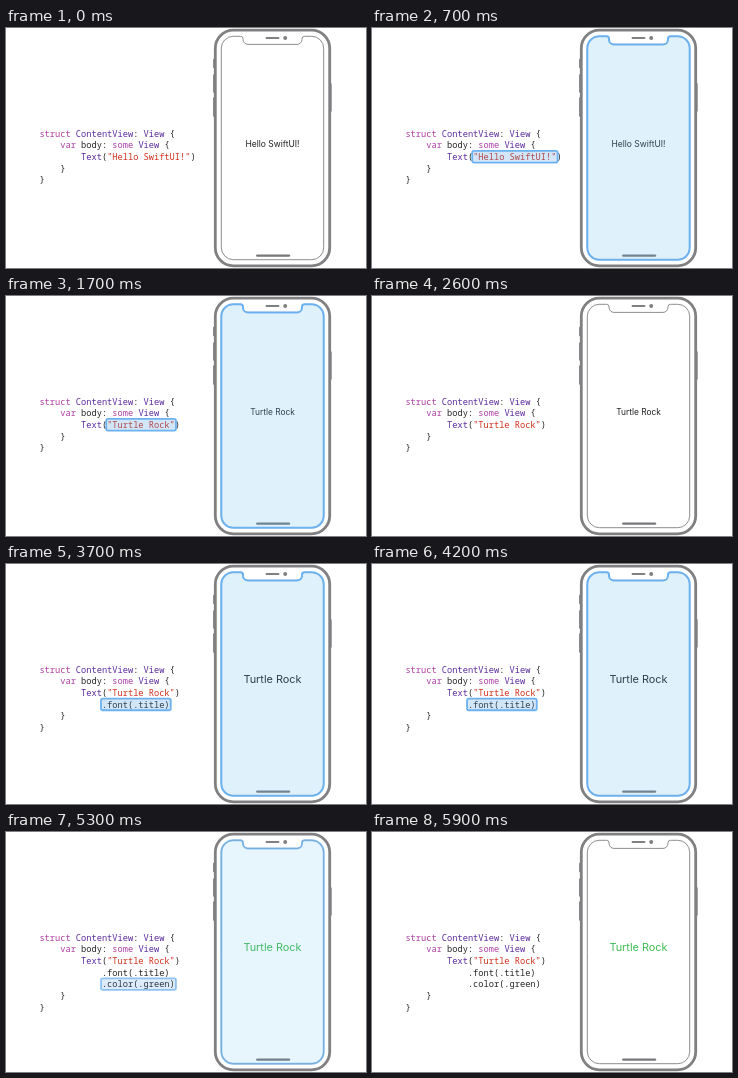
These frames come from a looping animation (360 px wide and 240 px high, 6200 ms). An HTML page with a canvas:

```html
<!DOCTYPE html>
<html lang="en">
<head>
<meta charset="utf-8">
<title>Code and preview</title>
<style>
html, body { margin: 0; width: 100%; height: 100%; overflow: hidden; background: #fff; }
canvas { display: block; width: 360px; height: 240px; }
</style>
</head>
<body>
<canvas id="stage"></canvas>
<script>
const W = 360, H = 240, LOOP = 6200, STEP = 100;
const canvas = document.getElementById('stage');
const ctx = canvas.getContext('2d');
const ratio = window.devicePixelRatio || 1;
canvas.width = W * ratio;
canvas.height = H * ratio;

const CODE_FONT = '8.68px "Noto Sans Mono", "DejaVu Sans Mono", monospace';
const CODE_X = 33.4, CODE_Y = 108.6, LINE = 11.68, CHAR = 5.21;
const INK = '#242424', KEYWORD = '#ad3da4', TYPE = '#5b2a9d', STRING = '#d12f1b';
const GREY = '#808083', BLUE = '#6cb2f1';
const CENTER = 266.5;

const mix = (a, b, k) => a + (b - a) * k;

function ease(t, start, end) {
  const k = Math.min(1, Math.max(0, (t - start) / (end - start)));
  return k * k * (3 - 2 * k);
}

function withAlpha(alpha, draw) {
  if (alpha <= 0) return;
  ctx.save();
  ctx.globalAlpha *= alpha;
  draw();
  ctx.restore();
}

function line(x1, y1, x2, y2, width, color = GREY) {
  ctx.beginPath();
  ctx.moveTo(x1, y1);
  ctx.lineTo(x2, y2);
  ctx.lineWidth = width;
  ctx.lineCap = 'round';
  ctx.strokeStyle = color;
  ctx.stroke();
}

function roundedPath(points) {
  ctx.beginPath();
  const [first] = points, last = points[points.length - 1];
  ctx.moveTo((first[0] + last[0]) / 2, (first[1] + last[1]) / 2);
  points.forEach(([x, y, r], i) => {
    const next = points[(i + 1) % points.length];
    ctx.arcTo(x, y, next[0], next[1], r);
  });
  ctx.closePath();
}

function boxPath(left, top, right, bottom, r) {
  roundedPath([[left, top, r], [right, top, r], [right, bottom, r], [left, bottom, r]]);
}

function screenPath() {
  roundedPath([
    [215.3, 8.3, 12], [237, 8.3, 2.5], [237, 16.4, 5], [296, 16.4, 5],
    [296, 8.3, 2.5], [317.7, 8.3, 12], [317.7, 231.7, 12], [215.3, 231.7, 12]
  ]);
}

// Each part is [text, color]; columns follow the monospaced grid.
function codeLine(row, column, ...parts) {
  ctx.font = CODE_FONT;
  ctx.textAlign = 'left';
  for (const [text, color = INK] of parts) {
    ctx.fillStyle = color;
    ctx.fillText(text, CODE_X + column * CHAR, CODE_Y + row * LINE);
    column += text.length;
  }
}

function textCall(value) {
  codeLine(2, 8, ['Text', TYPE], ['('], [`"${value}"`, STRING], [')']);
}

function drawCode(s) {
  codeLine(0, 0, ['struct', KEYWORD], [' '], ['ContentView', TYPE], [': '], ['View', TYPE], [' {']);
  codeLine(1, 4, ['var', KEYWORD], [' body: '], ['some', KEYWORD], [' '], ['View', TYPE], [' {']);
  withAlpha(1 - s.rename, () => textCall('Hello SwiftUI!'));
  withAlpha(s.rename, () => textCall('Turtle Rock'));
  withAlpha(s.title, () => codeLine(3, 12, ['.font(.title)']));
  withAlpha(s.green, () => codeLine(4, 12, ['.color(.green)']));
  const shift = s.title + s.green;
  codeLine(3 + shift, 4, ['}']);
  codeLine(4 + shift, 0, ['}']);
}

function highlightCode(row, column, length) {
  const x = CODE_X + column * CHAR;
  const y = CODE_Y + row * LINE - 3.2;
  boxPath(x - 0.9, y - 5.8, x + length * CHAR + 1.1, y + 5.8, 1.8);
  ctx.fillStyle = 'rgba(70,150,225,0.24)';
  ctx.fill();
  ctx.lineWidth = 1.8;
  ctx.strokeStyle = BLUE;
  ctx.stroke();
}

function label(text, size, color) {
  ctx.font = `${size}px Inter, Roboto, sans-serif`;
  ctx.textAlign = 'center';
  ctx.fillStyle = color;
  ctx.fillText(text, CENTER, 115.5 + size * 0.36);
}

function drawPhone(s) {
  for (const [top, bottom] of [[31.5, 39.5], [47, 64], [70, 88]]) line(207.8, top, 207.8, bottom, 1.4);
  line(325, 56, 325, 83, 1.4);
  boxPath(209.3, 2.2, 323.7, 237.8, 18);
  ctx.fillStyle = '#fff';
  ctx.fill();
  ctx.lineWidth = 2.8;
  ctx.strokeStyle = GREY;
  ctx.stroke();

  screenPath();
  ctx.lineWidth = 0.9;
  ctx.stroke();
  line(260.5, 10, 272.5, 10, 1.8);
  ctx.beginPath();
  ctx.arc(279.2, 10, 2, 0, Math.PI * 2);
  ctx.fillStyle = GREY;
  ctx.fill();
  line(251.3, 227.6, 283, 227.6, 2.4, '#77777a');

  const channel = (dark, bright) => Math.round(mix(dark, bright, s.green));
  const color = `rgb(${channel(34, 61)},${channel(34, 187)},${channel(36, 84)})`;
  withAlpha(1 - s.rename, () => label('Hello SwiftUI!', 8.5, color));
  withAlpha(s.rename, () => label('Turtle Rock', mix(8.4, 10.9, s.title), color));
}

function highlightPhone() {
  screenPath();
  ctx.fillStyle = 'rgba(95,185,235,0.2)';
  ctx.fill();
  ctx.lineWidth = 2;
  ctx.strokeStyle = BLUE;
  ctx.stroke();
}

function render(t) {
  const s = {
    rename: ease(t, 1300, 1600),
    title: ease(t, 3050, 3400),
    green: ease(t, 4400, 4650)
  };
  const firstGlow = ease(t, 0, 600) * (1 - ease(t, 2050, 2600));
  const secondGlow = ease(t, 3000, 3600) * (1 - ease(t, 5100, 5700));

  ctx.setTransform(ratio, 0, 0, ratio, 0, 0);
  ctx.fillStyle = '#fff';
  ctx.fillRect(0, 0, W, H);
  drawCode(s);
  drawPhone(s);
  withAlpha(firstGlow, () => highlightCode(2, 13, mix(16, 13, s.rename)));
  withAlpha(secondGlow, () => highlightCode(3 + s.green, 12, 13 + s.green));
  withAlpha(Math.max(firstGlow, secondGlow), highlightPhone);
}

const start = performance.now();
function tick() {
  const elapsed = (performance.now() - start) % LOOP;
  render(Math.floor(elapsed / STEP) * STEP);
  requestAnimationFrame(tick);
}
tick();
</script>
</body>
</html>
```
